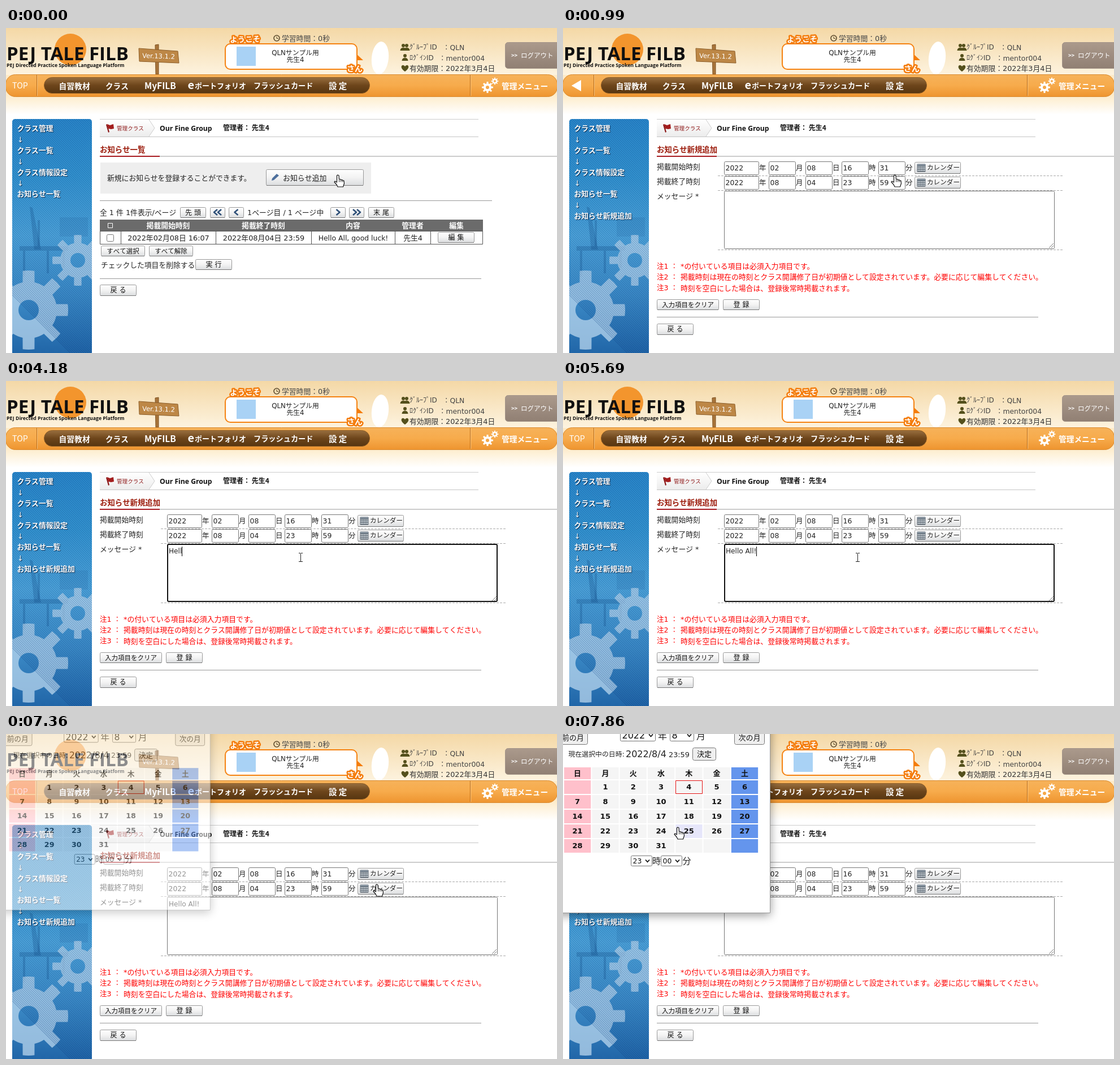
An HTML page with a canvas that plays this animation: 975x575 px, repeating every 8 s.

```html
<!DOCTYPE html>
<html lang="ja">
<head>
<meta charset="utf-8">
<style>
html, body { margin: 0; width: 100%; height: 100%; overflow: hidden; background: #fff; }
canvas { display: block; }
</style>
</head>
<body>
<canvas id="stage" width="975" height="575"></canvas>
<script>
const stage = document.getElementById('stage').getContext('2d');
const popupLayer = document.createElement('canvas');
popupLayer.width = 975;
popupLayer.height = 575;
const popup = popupLayer.getContext('2d');
let c = stage; // context the helpers draw on

const LOOP = 8000;
const SANS = '"DejaVu Sans","Noto Sans CJK JP",sans-serif';
const GOTHIC = '"Noto Sans CJK JP",sans-serif';
const HUMAN = '"Open Sans","Noto Sans CJK JP",sans-serif';

// y is the optical middle of the line
function text(s, x, y, size = 13, color = '#222', { bold, align = 'left', font = SANS } = {}) {
  c.font = `${bold ? 'bold ' : ''}${size}px ${font}`;
  c.textAlign = align;
  c.fillStyle = color;
  c.fillText(s, x, y + size * 0.37);
}
function rect(x, y, w, h, color) {
  c.fillStyle = color;
  c.fillRect(x, y, w, h);
}
function vertical(y0, y1, ...colors) {
  const g = c.createLinearGradient(0, y0, 0, y1);
  colors.forEach((k, i) => g.addColorStop(i / (colors.length - 1), k));
  return g;
}
function box(x, y, w, h, r, fill, stroke, line = 1) {
  c.beginPath();
  c.roundRect(x + line / 2, y + line / 2, w - line, h - line, r);
  if (fill) { c.fillStyle = fill; c.fill(); }
  if (stroke) { c.strokeStyle = stroke; c.lineWidth = line; c.stroke(); }
}
function poly(points, fill, stroke, line = 1) {
  c.beginPath();
  points.forEach(([x, y]) => c.lineTo(x, y));
  c.closePath();
  if (fill) { c.fillStyle = fill; c.fill(); }
  if (stroke) { c.strokeStyle = stroke; c.lineWidth = line; c.lineJoin = 'round'; c.stroke(); }
}
function polyline(points, stroke, line = 1) {
  c.beginPath();
  points.forEach(([x, y]) => c.lineTo(x, y));
  c.strokeStyle = stroke;
  c.lineWidth = line;
  c.stroke();
}
function disc(x, y, r, color) {
  c.beginPath();
  c.arc(x, y, r, 0, 7);
  c.fillStyle = color;
  c.fill();
}
function gear(x, y, root, tip, hole, color) {
  c.beginPath();
  const step = Math.PI / 4;
  for (let i = 0; i < 8; i++) {
    const a = i * step - Math.PI / 2;
    c.arc(x, y, root, a - step / 2, a - step * 0.27);
    c.arc(x, y, tip, a - step * 0.19, a + step * 0.19);
    c.arc(x, y, root, a + step * 0.27, a + step / 2);
  }
  c.closePath();
  c.moveTo(x + hole, y);
  c.arc(x, y, hole, 0, Math.PI * 2);
  c.fillStyle = color;
  c.fill('evenodd');
}
function button(x, y, w, h, label, size = 12) {
  box(x, y, w, h, 2, vertical(y, y + h, '#fff', '#f3f3f3', '#dadcde'), '#999');
  rect(x + 1, y + h - 1, w - 2, 1, '#777');
  if (label) text(label, x + w / 2, y + h / 2, size, '#111', { align: 'center' });
}
function chevrons(x, y, dir, count) {
  for (let i = 0; i < count; i++) {
    const cx = x + (i - (count - 1) / 2) * 7;
    polyline([[cx - 3 * dir, y - 5], [cx + 3 * dir, y], [cx - 3 * dir, y + 5]], '#2f5078', 2.6);
  }
}
function outlined(s, x, y, size, tilt) {
  c.save();
  c.translate(x, y);
  c.rotate(tilt);
  c.font = `bold ${size}px ${GOTHIC}`;
  c.textAlign = 'center';
  c.lineJoin = 'round';
  c.lineWidth = 5;
  c.strokeStyle = '#f47c0c';
  c.strokeText(s, 0, size * 0.37);
  c.fillStyle = '#fff';
  c.fillText(s, 0, size * 0.37);
  c.restore();
}
function person(x, y, color) {
  disc(x, y - 3, 3, color);
  c.beginPath();
  c.arc(x, y + 6, 5.5, Math.PI, 0);
  c.fill();
}

function header(loading) {
  rect(0, 0, 975, 83, vertical(0, 83, '#f4d8a6', '#fdf3df'));
  rect(0, 83, 975, 70, vertical(83, 153, '#fdebc8', '#fdebc8', '#fff'));

  disc(114, 38, 28, '#f3952d');
  text('PEJ TALE FILB', 1, 45, 33, '#111', { bold: true, font: HUMAN });
  text('PEJ Directed Practice Spoken Language Platform', 1, 66, 8.7, '#111', { bold: true, font: HUMAN });

  poly([[264, 30], [270, 29], [270, 82], [265, 82]], '#a8743a', '#7d5122');
  poly([[235, 36], [304, 41], [306, 62], [236, 59]], '#bd8746', '#8d5f2a');
  c.save();
  c.translate(270, 49.5);
  c.rotate(0.03);
  text('Ver.13.1.2', 0, 0, 11.5, '#fff', { align: 'center' });
  c.restore();

  poly([[619, 45], [632, 57], [619, 57]], '#f47c0c');
  box(387, 27, 235, 47, 9, '#fff', '#f58211', 2);
  if (!loading) rect(408, 33, 34, 34, '#a9d2f5');
  text('QLNサンプル用', 512, 44, 11.8, '#222', { align: 'center' });
  text('先生4', 512, 56, 11.8, '#222', { align: 'center' });
  outlined('ようこそ', 423, 20, 13.5, -0.03);
  outlined('さん', 617, 72, 14, 0.03);

  c.beginPath();
  c.arc(479, 18, 5, 0, 7);
  c.strokeStyle = '#5b4a2c';
  c.lineWidth = 1.6;
  c.stroke();
  polyline([[479, 15], [479, 18.5], [482, 18.5]], '#5b4a2c');
  text('学習時間：0秒', 488, 18, 12.8, '#444');

  c.beginPath();
  c.ellipse(662, 53, 15, 29, 0.1, 0, 7);
  c.fillStyle = '#fff';
  c.fill();

  const icon = '#54501c';
  person(703, 34, icon);
  person(709, 34, icon);
  person(706, 52, icon);
  c.beginPath();
  c.moveTo(706, 77);
  c.bezierCurveTo(694, 69, 702, 62, 706, 68);
  c.bezierCurveTo(710, 62, 718, 69, 706, 77);
  c.fillStyle = icon;
  c.fill();
  text('ｸﾞﾙｰﾌﾟID', 714, 34, 12, '#444');
  text('：QLN', 773, 34, 12.4, '#444');
  text('ﾛｸﾞｲﾝID', 714, 53, 12, '#444');
  text('：mentor004', 766, 53, 12.4, '#444');
  text('有効期限：2022年3月4日', 714, 71, 12.8, '#333');

  box(883, 25, 100, 47, 5, vertical(25, 72, '#ab9a8c', '#907f73'), '#a39489');
  text('>>', 894, 48, 9.5, '#fff', { bold: true, font: GOTHIC });
  text('ログアウト', 911, 48.5, 11.5, '#fff');

  box(-1, 82, 977, 40, 17, vertical(82, 121, '#f6b25a', '#f7ab4c', '#ee9530'), '#d98a30');
  for (const x of [54, 821]) {
    rect(x, 83, 1, 37, '#b86a17');
    rect(x + 1, 83, 1, 37, '#fac680');
  }
  if (loading) poly([[15, 102], [32, 92], [32, 112]], '#fff');
  else text('TOP', 11, 102, 14.3, '#fff', { font: GOTHIC });
  box(67, 87, 577, 29, 14, vertical(87, 116, '#9a7040', '#6d451b', '#563510'), '#8a5a24');
  const menu = { bold: true, font: GOTHIC };
  text('自習教材', 93.5, 102.5, 13.8, '#fff', menu);
  text('クラス', 176, 102.5, 13.6, '#fff', menu);
  text('MyFILB', 245, 102.5, 15.5, '#fff', menu);
  text('e', 321.5, 101, 20, '#fff', menu);
  text('ポートフォリオ', 334, 102.5, 13, '#fff', menu);
  text('フラッシュカード', 438, 102.5, 13.2, '#fff', menu);
  text('設 定', 571, 102.5, 14.5, '#fff', menu);
  gear(852, 105, 7, 10, 3, '#fff');
  gear(865, 94, 4.3, 6.3, 2, '#fff');
  text('管理メニュー', 877, 103, 13.7, '#fff', menu);
}

function sidebar(items) {
  c.save();
  c.beginPath();
  c.roundRect(11, 161, 141, 430, 5);
  c.clip();
  rect(11, 161, 141, 414, vertical(161, 575, '#2b8acd', '#3596d2', '#4fa6dc', '#3d8cc8', '#2166a8'));
  const shade = 'rgba(20,75,135,.28)';
  poly([[42, 316], [47, 318], [62, 392], [50, 392]], shade);
  rect(24, 386, 86, 8, shade);
  for (const [x, y, h] of [[30, 394, 46], [72, 394, 40], [100, 394, 30], [56, 340, 46]]) rect(x, y, 4, h, shade);
  rect(95, 335, 50, 34, 'rgba(20,75,135,.13)');
  const pale = 'rgba(190,218,240,.72)';
  gear(127, 411, 31, 45, 13, pale);
  gear(40, 499, 50, 70, 18, pale);
  c.beginPath();
  for (let x = -300; x < 160; x += 4) {
    c.moveTo(x, 161);
    c.lineTo(x + 414, 575);
  }
  c.strokeStyle = 'rgba(10,60,125,.33)';
  c.lineWidth = 1.1;
  c.stroke();
  c.restore();

  c.save();
  c.shadowColor = '#0a2c50';
  c.shadowOffsetX = c.shadowOffsetY = c.shadowBlur = 1;
  items.forEach((s, i) => {
    const y = 177.5 + i * 38.7;
    text(s, 19.5, y, 12.8, '#fff', { bold: true, font: GOTHIC });
    if (i) text('↓', 20, y - 19, 12.8, '#fff');
  });
  c.restore();
}

function heading(title) {
  rect(166, 161, 670, 1, '#ccc');
  rect(166, 192, 670, 1, '#c4c4c4');
  poly([[166, 162], [253, 162], [263, 177], [253, 192], [166, 192]], vertical(162, 192, '#fff', '#ececec'));
  polyline([[253, 162], [263, 177], [253, 192]], '#ccc');
  poly([[177, 171], [179, 170], [183, 184], [181, 185]], '#8a1515');
  poly([[179, 170], [184, 172], [190, 170], [191, 178], [186, 179], [181, 178]], '#a31d1d');
  text('管理クラス', 196, 177, 9.6, '#8f1a1a');
  text('Our Fine Group', 272, 177, 12.2, '#111', { bold: true, font: '"Noto Sans",sans-serif' });
  text('管理者： 先生4', 384, 177, 12, '#111', { bold: true, font: GOTHIC });
  text(title, 166, 215, 13.4, '#9c1c0c', { font: GOTHIC, bold: true });
  rect(272, 226, 703, 2, '#ccc');
  rect(166, 226, 106, 2, '#a81c22');
}

const TRAIL = ['クラス管理', 'クラス一覧', 'クラス情報設定', 'お知らせ一覧', 'お知らせ新規追加'];

function listPage(pressed) {
  sidebar(TRAIL.slice(0, 4));
  heading('お知らせ一覧');
  rect(167, 238, 479, 55, '#eee');
  text('新規にお知らせを登録することができます。', 179, 265, 12.8);
  button(460, 250, 173, 29);
  if (pressed) box(460, 250, 173, 29, 2, null, '#555');
  poly([[470, 270], [471, 266], [479, 258], [483, 261], [474, 269]], '#4d6f9c');
  text('お知らせ追加', 490, 265, 12.9);

  rect(166, 305, 694, 1, '#999');
  text('全 1 件 1件表示/ページ', 166, 326, 12.8);
  button(308, 317, 46, 19, '先 頭');
  for (const [x, dir, n] of [[361, -1, 2], [394, -1, 1], [574, 1, 1], [607, 1, 2]]) {
    button(x, 317, 27, 19);
    chevrons(x + 13.5, 326, dir, n);
  }
  text('1ページ目 / 1 ページ中', 427, 326, 12.8);
  button(641, 317, 46, 19, '末 尾');

  const cols = [166, 203, 371, 540, 688, 751, 843];
  const names = ['', '掲載開始時刻', '掲載終了時刻', '内容', '管理者', '編集'];
  const cells = ['', '2022年02月08日 16:07', '2022年08月04日 23:59', 'Hello All, good luck!', '先生4', ''];
  rect(166, 339, 678, 21, '#6b6b6b');
  box(166, 359, 678, 24, 0, '#fff', '#555');
  names.forEach((s, i) => {
    const mid = (cols[i] + cols[i + 1]) / 2;
    if (i) rect(cols[i], 360, 1, 22, '#555');
    text(s, mid, 349, 12.8, '#fff', { bold: true, align: 'center', font: GOTHIC });
    text(cells[i], mid + 0.5, 371, i === 3 ? 12.4 : 12.8, '#222', { align: 'center' });
  });
  box(180, 345, 9, 9, 0, null, '#fff');
  box(178, 365, 13, 13, 2, '#fff', '#767676');
  button(764, 361, 65, 19, '編 集');
  button(168, 385, 78, 19, 'すべて選択', 11.5);
  button(253, 385, 78, 19, 'すべて解除', 11.5);
  text('チェックした項目を削除する', 168, 419, 12.8);
  button(335, 409, 65, 19, '実 行');
  rect(166, 443, 675, 1, '#999');
  button(166, 454, 65, 20, '戻 る');
}

function dashes(y) {
  for (let x = 274; x < 881; x += 6) rect(x, y, 4, 1, '#aaa');
}

function dateRow(label, y, values) {
  text(label, 166, y - 1.5, 12.8);
  [285, 364, 429, 493, 558].forEach((x, i) => {
    const w = i ? 48 : 62;
    box(x, y - 11, w, 24, 2, '#fff', '#767676');
    text(values[i], x + 2.5, y + 0.5, 12.4);
    text('年月日時分'[i], x + w, y, 12.5);
  });
  button(622, y - 10, 82, 21);
  box(626, y - 7, 16, 15, 1, '#4a5560');
  rect(627, y - 6, 14, 3, '#8794a0');
  for (let r = 0; r < 3; r++)
    for (let k = 0; k < 5; k++) rect(627.5 + k * 2.8, y - 2 + r * 3, 2, 2, '#e4ebf0');
  text('カレンダー', 644, y, 11.6);
}

function formPage(message, focus, caret) {
  sidebar(TRAIL);
  heading('お知らせ新規追加');
  dateRow('掲載開始時刻', 247, ['2022', '02', '08', '16', '31']);
  dateRow('掲載終了時刻', 273, ['2022', '08', '04', '23', '59']);
  [261, 287, 392].forEach(dashes);
  text('メッセージ *', 166, 297, 12.8);
  box(285, 288, 585, 103, 2, '#fff', focus ? '#111' : '#767676', focus ? 2 : 1);
  polyline([[860, 389], [868, 381]], '#777');
  polyline([[864, 389], [868, 385]], '#777');
  text(message, 288, 300.5, 12.1);
  if (caret) rect(Math.round(288 + c.measureText(message).width), 293, 1, 17, '#000');

  const notes = [
    '*の付いている項目は必須入力項目です。',
    '掲載時刻は現在の時刻とクラス開講修了日が初期値として設定されています。必要に応じて編集してください。',
    '時刻を空白にした場合は、登録後常時掲載されます。'
  ];
  notes.forEach((s, i) => {
    const y = 421 + i * 19.4;
    text(`注${i + 1} ：`, 166, y, 12.5, '#f00');
    text(s, 208, y, 12.85, '#f00');
  });
  button(166, 480, 110, 19, '入力項目をクリア', 11.5);
  button(283, 480, 65, 19, '登 録');
  rect(166, 511, 675, 1, '#999');
  button(166, 523, 65, 20, '戻 る');
}

function dropdown(x, y, w, h, label, size) {
  box(x, y, w, h, 2, '#fff', '#767676');
  text(label, x + 3.5, y + h / 2, size, '#111');
  const mx = x + w - 8.5, my = y + h / 2;
  polyline([[mx - 3.5, my - 2], [mx, my + 2], [mx + 3.5, my - 2]], '#111', 1.8);
}
function plainButton(x, y, w, h, label) {
  box(x, y, w, h, 3, '#efefef', '#767676');
  text(label, x + w / 2, y + h / 2, 13, '#111', { align: 'center' });
}

function calendar(hover) {
  c.save();
  c.shadowColor = 'rgba(0,0,0,.4)';
  c.shadowBlur = 16;
  c.shadowOffsetY = 4;
  rect(-67, -101, 434, 418, '#fff');
  c.restore();
  box(-67, -101, 434, 418, 0, null, '#999');

  plainButton(-9, -7, 53, 26, '前の月');
  dropdown(101, -8, 63, 21, '2022', 16);
  text('年', 168, 3, 16);
  dropdown(189, -8, 43, 21, '8', 16);
  text('月', 236, 3, 16);
  plainButton(303, -7, 54, 26, '次の月');
  text('現在選択中の日時:', 9.5, 36, 11.9);
  text('2022/8/4', 111, 35, 16);
  text('23:59', 187, 36, 12.8);
  plainButton(229, 24, 42, 23, '決定');

  const bold = { bold: true, align: 'center' };
  for (let col = 0; col < 7; col++) {
    const x = 2 + col * 49.3;
    const tint = col === 0 ? '#ffc0cb' : col === 6 ? '#6495ed' : '#f5f5f5';
    rect(x, 59, 47.3, 21, tint);
    text('日月火水木金土'[col], x + 23.6, 69, 13, '#111', bold);
    for (let row = 0; row < 5; row++) {
      const day = row * 7 + col;
      const y = 82 + row * 26;
      rect(x, y, 47.3, 24, hover === day ? '#e6e6fa' : tint);
      if (day === 4) box(199, y, 48, 24, 0, null, '#e01010');
      if (day > 0 && day < 32) text(day, x + 23.6, y + 11.5, 13, '#111', bold);
    }
  }
  dropdown(120, 215, 38, 19, '23', 12.4);
  text('時', 158, 224, 15);
  dropdown(173, 215, 38, 19, '00', 12.4);
  text('分', 211.5, 224, 15);
}

// The window is composed on its own layer so it fades as one piece.
function openCalendar(scale, alpha, hover) {
  c = popup;
  c.clearRect(0, 0, 975, 575);
  c.save();
  c.translate(150, 108);
  c.scale(scale, scale);
  c.translate(-150, -108);
  calendar(hover);
  c.restore();
  c = stage;
  c.globalAlpha = alpha;
  c.drawImage(popupLayer, 0, 0);
  c.globalAlpha = 1;
}

const POINTERS = {
  hand(x, y) {
    poly([[0, 0], [2, 1], [2.5, 8], [5, 7.5], [6, 9], [8, 8.5], [9, 10], [11, 10], [11.5, 15],
      [9.5, 21], [0, 21], [-2, 17], [-6, 12.5], [-5, 11], [-1.5, 13], [-1.5, 1]]
      .map(([a, b]) => [x + a, y + b]), '#fff', '#111', 1.2);
    for (const d of [2.7, 5.8, 8.8]) polyline([[x + d, y + 9], [x + d, y + 12.5]], '#111');
  },
  beam(x, y) {
    rect(x, y - 7, 1, 15, '#222');
    for (const dy of [-8, 7]) {
      rect(x - 3, y + dy, 3, 1, '#222');
      rect(x + 1, y + dy, 3, 1, '#222');
    }
  },
  arrow(x, y) {
    poly([[0, 0], [0, 16], [4, 12.5], [6.5, 18], [9, 17], [6.5, 11.5], [11.5, 11]]
      .map(([a, b]) => [x + a, y + b]), '#fff', '#111');
  }
};

// Each step list starts with the time in ms from which it holds.
const POINTER_STEPS = [
  [0, 'hand', 587, 260], [1330, 'beam', 560, 286], [1500, 'beam', 530, 305], [1670, 'beam', 501, 319],
  [1840, 'beam', 481, 328], [2010, 'beam', 473, 331], [3000, 'beam', 503, 319], [3180, 'beam', 521, 312],
  [6520, 'beam', 540, 308], [6690, 'beam', 600, 293], [6850, 'hand', 647, 270], [7020, 'hand', 656, 266],
  [7530, 'arrow', 589, 255], [7700, 'arrow', 350, 205], [7860, 'hand', 203, 165]
];
const TYPING = [
  [0, ''], [3840, 'H'], [4010, 'Hel'], [4180, 'Hell'], [4340, 'Hello'], [4510, 'Hello '],
  [4840, 'Hello A'], [5010, 'Hello Al'], [5190, 'Hello All'], [5690, 'Hello All!']
];
const CARET = [[0, false], [2670, true], [3180, false], [3840, true], [6190, false], [6690, true], [7190, false]];
const POPUP = [[0, 1, 0], [7360, 0.976, 0.52], [7530, 0.996, 0.92], [7700, 1, 1]];
const at = (steps, t) => steps.filter(s => s[0] <= t).pop().slice(1);

function draw(t) {
  rect(0, 0, 975, 575, '#fff');
  header(t >= 830 && t < 1160);
  if (t < 830) listPage(t >= 660);
  else formPage(at(TYPING, t)[0], t >= 2670 && t < 7190, at(CARET, t)[0]);
  const [scale, alpha] = at(POPUP, t);
  if (alpha) openCalendar(scale, alpha, t >= 7860 ? 25 : -1);
  const [kind, x, y] = at(POINTER_STEPS, t);
  POINTERS[kind](x, y);
}

const start = performance.now();
function tick() {
  draw((performance.now() - start) % LOOP);
  requestAnimationFrame(tick);
}
tick();
</script>
</body>
</html>
```
